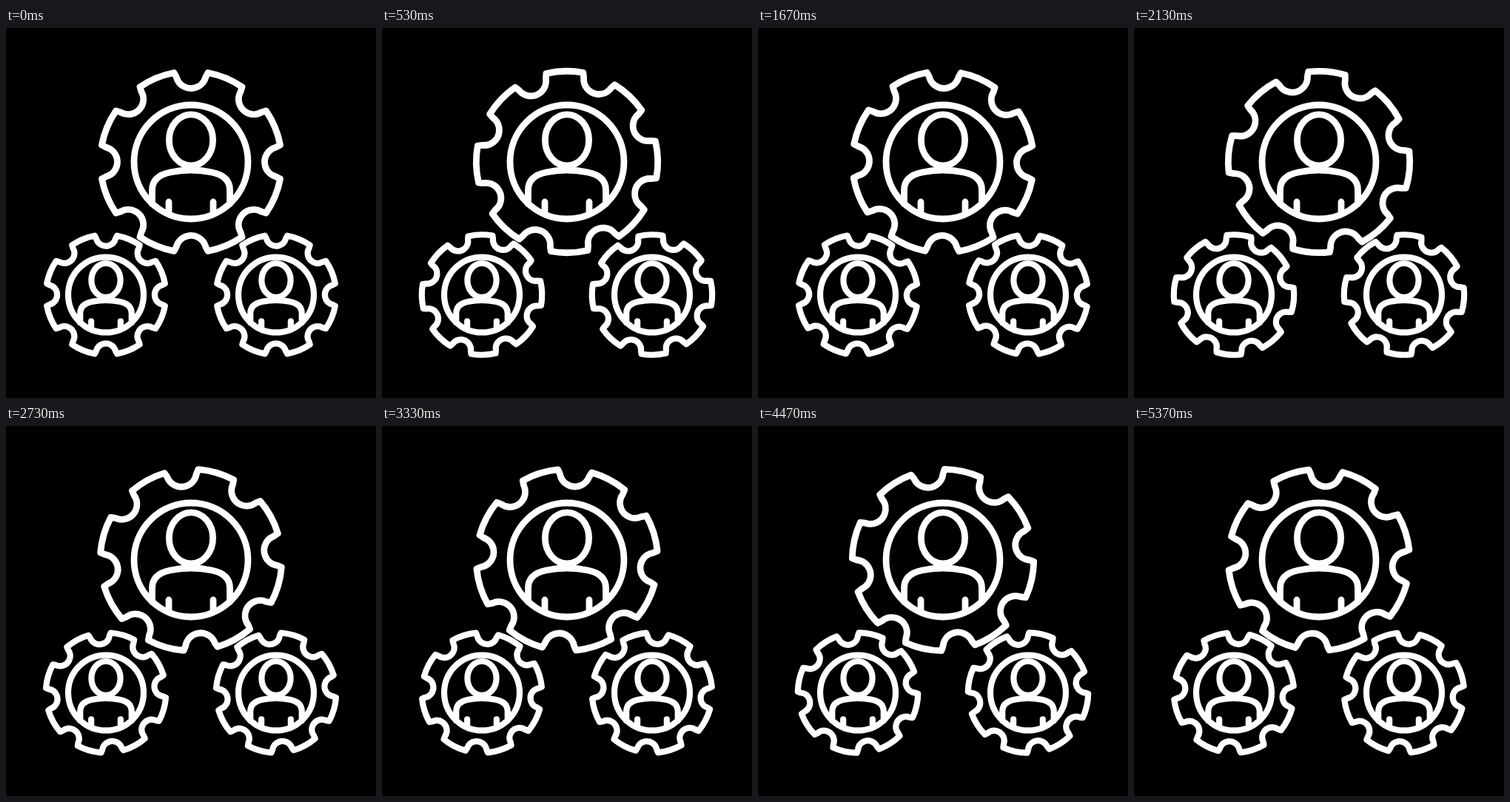
Recreate the animation shown at these times as an HTML page with a canvas. Size 500 by 500 pixels, loop 5.41 s.

```html
<!DOCTYPE html>
<html lang="en">
<head>
<meta charset="utf-8">
<title>Team gears</title>
<style>
  html, body { margin: 0; width: 100%; height: 100%; overflow: hidden; background: #000; }
  canvas { display: block; }
</style>
</head>
<body>
<canvas id="stage" width="500" height="500"></canvas>
<script>
const ctx = document.getElementById('stage').getContext('2d');
const LOOP = 5410, FPS = 30, TEETH = 8;
const RIM = 122.7, NOTCH = 0.188; // outer radius, half the notch angle

// Turn of the gears in degrees: [step, angle], slightly uneven over two turns
const TURN = [[0, 0], [16, -69], [37, -165.8], [64, -287.5], [100, -444.9],
              [134, -594.8], [161, -715.7], [162, -720]];

const person = new Path2D(
  'M-52.5 57V38C-52.5 24-43 17-28 14Q-14 11 0 11Q14 11 28 14C43 17 52.5 24 52.5 38V57' +
  'M-30 54V71M30 54V71');
person.moveTo(29.6, -29.6);
person.ellipse(0, -29.6, 29.6, 34.6, 0, 0, 2 * Math.PI);
person.moveTo(77, 0);
person.arc(0, 0, 77, 0, 2 * Math.PI);

function makeGear() {
  const gear = new Path2D(), step = 2 * Math.PI / TEETH;
  for (let i = 0; i < TEETH; i++) {
    const mid = i * step, c = Math.cos(mid), s = Math.sin(mid);
    gear.arc(0, 0, RIM, mid - step + NOTCH, mid - NOTCH);
    gear.arc(120 * c, 120 * s, 20.5, mid - 1.83, mid + 1.83, true);
  }
  gear.closePath();
  return gear;
}
const gear = makeGear();

function angleAt(step) {
  const i = TURN.findIndex(([n]) => n > step);
  const [n0, a0] = TURN[i - 1], [n1, a1] = TURN[i];
  return (a0 + (a1 - a0) * (step - n0) / (n1 - n0)) * Math.PI / 180;
}

function drawMember(x, y, scale, line, angle) {
  ctx.save();
  ctx.translate(x, y);
  ctx.scale(scale, scale);
  ctx.lineWidth = line / scale;
  ctx.stroke(person);
  ctx.rotate(angle);
  ctx.stroke(gear);
  ctx.restore();
}

function draw(now) {
  const step = Math.min(161, Math.floor((now % LOOP + 5) * FPS / 1000));
  const angle = angleAt(step);
  ctx.fillStyle = '#000';
  ctx.fillRect(0, 0, 500, 500);
  ctx.strokeStyle = '#fff';
  ctx.lineCap = ctx.lineJoin = 'round';
  drawMember(250, 181, 1, 8.8, angle);
  drawMember(135, 360.5, 0.662, 8.2, angle);
  drawMember(365, 360.5, 0.662, 8.2, angle);
}

let start;
function tick(now) {
  start ??= now;
  draw(now - start);
  requestAnimationFrame(tick);
}
draw(0);
requestAnimationFrame(tick);
</script>
</body>
</html>
```
